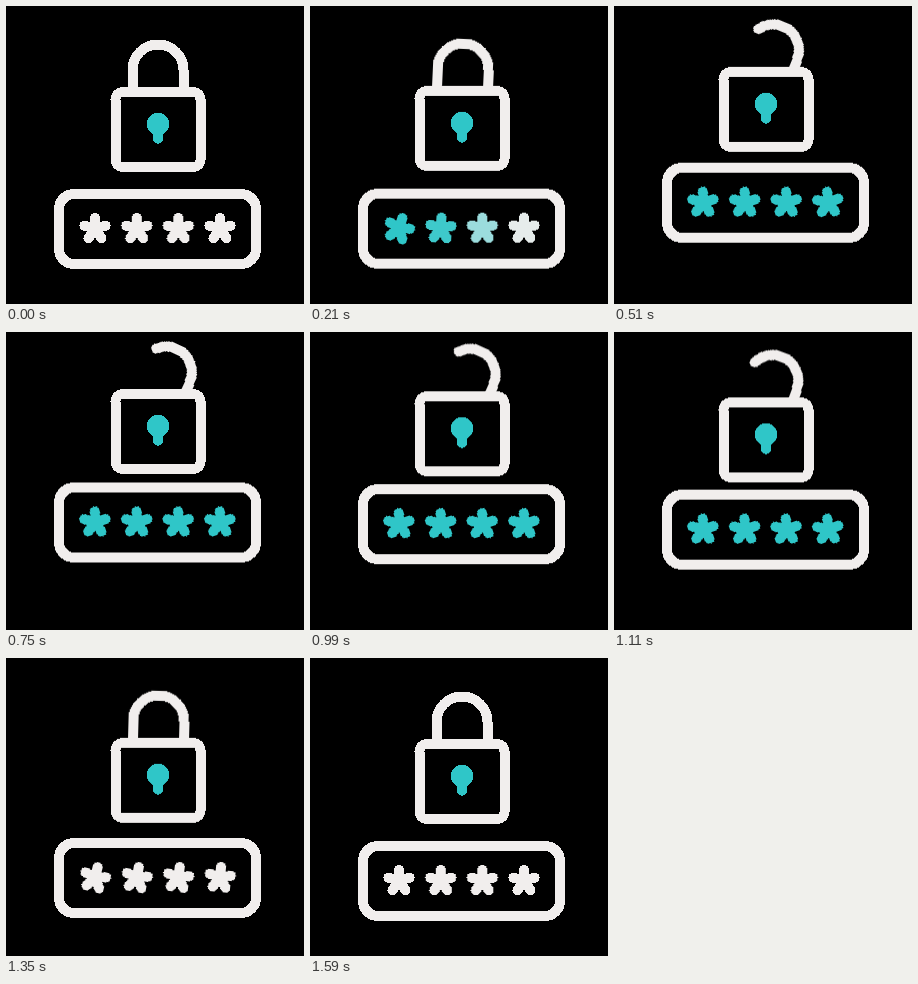
An HTML page for the animation above (1860 ms loop, 298 by 298 pixels).

```html
<!DOCTYPE html>
<html lang="en">
<head>
<meta charset="utf-8">
<title>Password unlock</title>
<style>
  html, body { margin: 0; width: 100%; height: 100%; overflow: hidden; background: #000; }
  svg { display: block; width: 100vw; height: 100vh; shape-rendering: crispEdges; }

  :root { --light: #f1eeed; --teal: #2fc6c8; }

  .line { fill: none; stroke: var(--light); stroke-width: 10; }
  .key { fill: var(--teal); stroke: var(--teal); }
  .star { fill: none; stroke: currentColor; stroke-width: 10; stroke-linecap: round; }

  .field, .lock, .shackle, .turn {
    animation: 1.86s cubic-bezier(.645, .045, .355, 1) infinite;
  }

  .field { animation-name: field; }
  @keyframes field {
    0%, 9.14%, 83%, 100% { transform: translateY(0); }
    38.17%, 46.13% { transform: translateY(-32.5px); }
  }

  .lock { animation-name: lock; }
  @keyframes lock {
    0%, 5%, 80.54%, 100% { transform: translateY(0); }
    39.41%, 43.66% { transform: translateY(-24px); }
  }

  /* The shackle tips to the right while its free end shortens. */
  .shackle {
    stroke-linecap: round;
    transform-origin: 152px 64px;
    animation-name: shackle;
  }
  @keyframes shackle {
    0%, 1.08%, 80.1%, 100% {
      transform: translateX(0) rotate(0deg);
      stroke-dasharray: 124px 200px;
    }
    38.71%, 48.98% {
      transform: translateX(8.3px) rotate(25deg);
      stroke-dasharray: 83px 200px;
    }
  }

  /* Each star changes colour and turns by one arm, in a wave. */
  .t1 { animation-name: turn1; }
  .t2 { animation-name: turn2; }
  .t3 { animation-name: turn3; }
  .t4 { animation-name: turn4; }

  @keyframes turn1 {
    0%, 5.16%, 80.91%, 100% { transform: rotate(0deg); }
    21.29%, 58.33% { transform: rotate(72deg); }
    0%, 3.23%, 71.8%, 100% { color: var(--light); }
    11.29%, 64.5% { color: var(--teal); }
  }
  @keyframes turn2 {
    0%, 8.39%, 80.11%, 100% { transform: rotate(0deg); }
    24.52%, 57.53% { transform: rotate(72deg); }
    0%, 5.38%, 70.43%, 100% { color: var(--light); }
    13.44%, 63.44% { color: var(--teal); }
  }
  @keyframes turn3 {
    0%, 11.61%, 79.3%, 100% { transform: rotate(0deg); }
    27.74%, 56.72% { transform: rotate(72deg); }
    0%, 7.53%, 69.09%, 100% { color: var(--light); }
    15.59%, 62.1% { color: var(--teal); }
  }
  @keyframes turn4 {
    0%, 14.84%, 78.49%, 100% { transform: rotate(0deg); }
    30.97%, 55.91% { transform: rotate(72deg); }
    0%, 9.68%, 67.74%, 100% { color: var(--light); }
    17.74%, 60.75% { color: var(--teal); }
  }
</style>
</head>
<body>
<svg viewBox="0 0 298 298">
  <defs>
    <path id="star" class="star" d="M0 0V-11.2M0 0L10.65-3.46M0 0L6.58 9.06M0 0L-6.58 9.06M0 0L-10.65-3.46"/>
    <clipPath id="above"><rect x="60" y="-40" width="190" height="127"/></clipPath>
  </defs>

  <g class="lock">
    <g clip-path="url(#above)">
      <path class="line shackle" d="M177.5 86V64A25.5 25.5 0 0 0 126.5 64V86"/>
    </g>
    <rect class="line" x="109.5" y="86" width="85" height="75" rx="7.5"/>
    <circle class="key" cx="152" cy="118" r="11.2" stroke-width="0"/>
    <path class="key" d="M152 118V132.5" stroke-width="10.5" stroke-linecap="round"/>
  </g>

  <g class="field">
    <rect class="line" x="53" y="188" width="197" height="70" rx="15"/>
    <g transform="translate(89 223)"><g class="turn t1"><use href="#star"/></g></g>
    <g transform="translate(130.8 223)"><g class="turn t2"><use href="#star"/></g></g>
    <g transform="translate(172.3 223)"><g class="turn t3"><use href="#star"/></g></g>
    <g transform="translate(214 223)"><g class="turn t4"><use href="#star"/></g></g>
  </g>
</svg>
</body>
</html>
```
